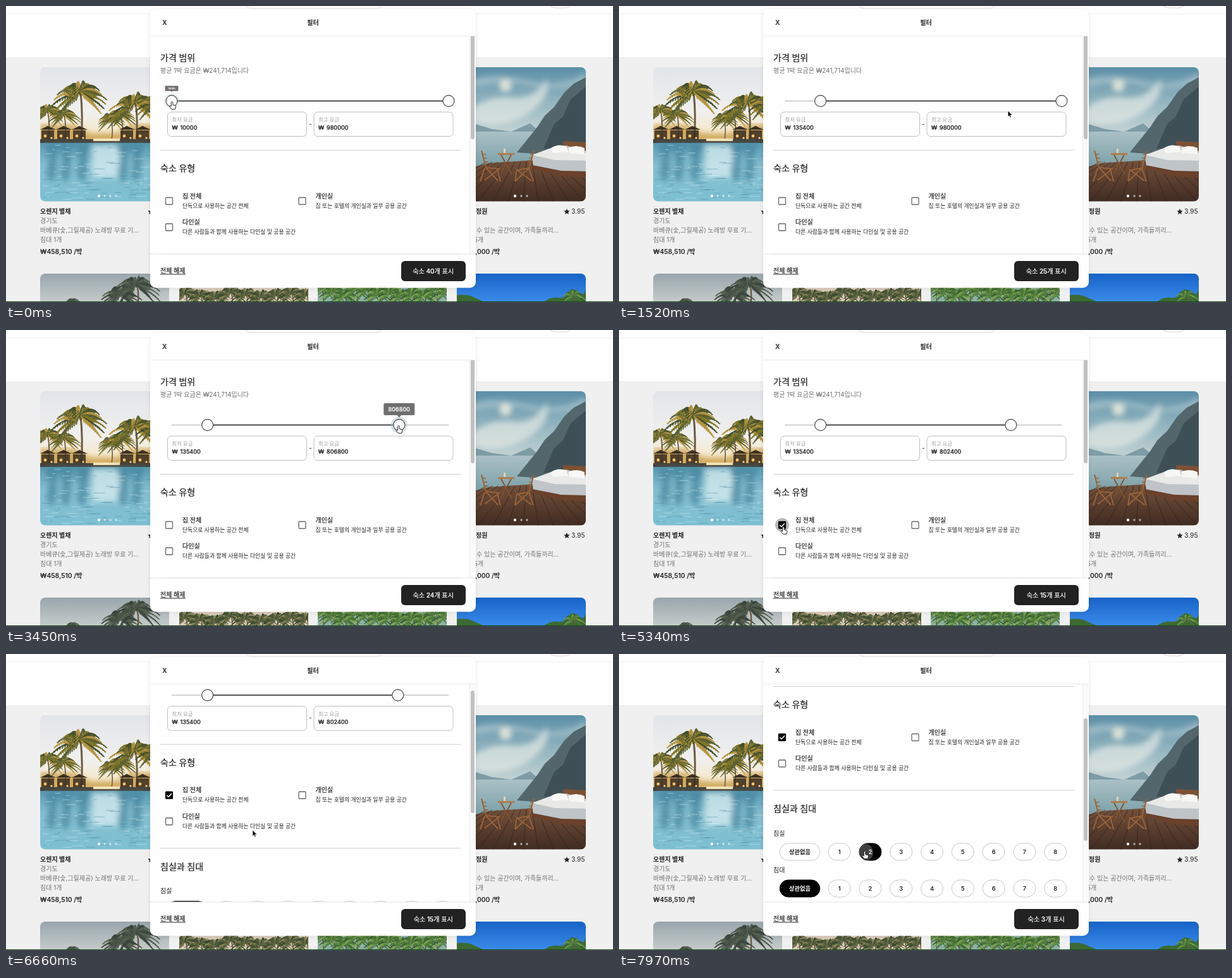
An HTML page for the animation above (8 s loop, 960x469 px).

```html
<!DOCTYPE html>
<html lang="ko">
<head>
<meta charset="utf-8">
<title>필터</title>
<style>
html, body { margin: 0; width: 100%; height: 100%; overflow: hidden; background: #fff; }
svg { display: block; width: 960px; height: 469px; }
text { font-family: Inter, "Noto Sans CJK KR", "Noto Sans CJK JP", "Noto Sans CJK", sans-serif; fill: #222; white-space: pre; }
.mid { text-anchor: middle; }
.grey { fill: #717171; }
.pale { fill: #a0a0a0; }
.semi { font-weight: 500; stroke: #222; stroke-width: .22px; }
.bold { font-weight: 600; }
.white { fill: #fff; stroke: #fff; }
</style>
</head>
<body>
<svg id="stage" viewBox="0 0 960 469"></svg>
<script>
const LOOP = 8000;
const clamp = v => Math.max(0, Math.min(1, v));
const ramp = (t, from, to) => clamp((t - from) / (to - from));

// Linear path through [time, ...values] points.
function along(keys, t) {
  const i = keys.findIndex(k => k[0] > t);
  if (i < 0) return keys[keys.length - 1].slice(1);
  if (i === 0) return keys[0].slice(1);
  const a = keys[i - 1], b = keys[i], p = ramp(t, a[0], b[0]);
  return a.slice(1).map((v, n) => v + (b[n + 1] - v) * p);
}

let seed = 7;
const rand = () => (seed = seed * 16807 % 2147483647) / 2147483647;

// ---- markup helpers; y is the middle of the text line
const text = (x, y, size, str, cls = '', id = '') =>
  `<text x="${x}" y="${y + size * .36}" font-size="${size}" class="${cls}" id="${id}">${str}</text>`;
const rect = (x, y, w, h, fill, more = '') =>
  `<rect x="${x}" y="${y}" width="${w}" height="${h}" fill="${fill}" ${more}/>`;
const path = (d, fill, more = '') => `<path d="${d}" fill="${fill}" ${more}/>`;
const line = (d, color, width = 1) => path(d, 'none', `stroke="${color}" stroke-width="${width}"`);
const dot = (x, y, r, fill, more = '') => `<circle cx="${x}" cy="${y}" r="${r}" fill="${fill}" ${more}/>`;
const grad = (id, ...stops) => `<linearGradient id="${id}" x2="0" y2="1">` +
  stops.map(([o, c]) => `<stop offset="${o}" stop-color="${c}"/>`).join('') + '</linearGradient>';
const clip = (id, x, y, w, h, r = 0) =>
  `<clipPath id="${id}">${rect(x, y, w, h, '#000', `rx="${r}"`)}</clipPath>`;
const soft = (...parts) => `<g filter="url(#soft)">${parts.join('')}</g>`;
const star = (x, y) => {
  let d = '';
  for (let i = 0; i < 10; i++) {
    const a = i * Math.PI / 5, r = i % 2 ? 2.2 : 5;
    d += `${i ? 'L' : 'M'}${x + r * Math.sin(a)} ${y - r * Math.cos(a)}`;
  }
  return path(d + 'Z', '#222');
};

// Arched fronds, each a rib with leaflets hanging on both sides.
function palm(x, y, r, base, colors) {
  let s = line(`M${x} ${y}Q${x + 4} ${(y + base) / 2} ${x + 1} ${base}`, '#6b5a40', r / 14);
  for (let i = 0; i < 16; i++) {
    const a = -Math.PI * (1.2 - i / 15 * 1.4), l = r * (.8 + rand() * .3);
    let d = `M${x} ${y}`, leaves = '';
    for (let k = 1; k <= 10; k++) {
      const p = k / 10, px = x + Math.cos(a) * l * p;
      const py = y + Math.sin(a) * l * p * (1.25 - p * .55) + l * .45 * p * p;
      const len = r * .24 * (1.15 - p);
      d += `L${px} ${py}`;
      leaves += `M${px} ${py}l${Math.cos(a) * len + len * .5} ${len}M${px} ${py}l${Math.cos(a) * len - len * .5} ${len * .8}`;
    }
    s += line(d + leaves, colors[i % colors.length], r / 26);
  }
  return s;
}

function poolPhoto() {
  const leaf = ['#5a6030', '#807528', '#44502c', '#b4933c'];
  let s = rect(54, 97, 204, 120, 'url(#dawn)');
  s += soft(path('M54 216V188h50l30 14h40l25-14h60V216Z', '#c79c45', 'opacity=".8"'));
  s += palm(66, 166, 26, 212, leaf) + palm(92, 172, 24, 212, leaf) + palm(166, 178, 22, 212, leaf) + palm(182, 172, 24, 212, leaf);
  s += palm(118, 136, 42, 213, leaf) + palm(205, 153, 40, 213, leaf) + palm(240, 150, 32, 213, leaf);
  for (let x = 54; x < 250; x += 25) {
    if (x > 122 && x < 165) continue;
    s += path(`M${x} 196l12-6 13 6Z`, '#3d3024') + rect(x + 2, 197, 20, 18, '#3a2e22', 'opacity=".85"');
    s += dot(x + 8, 206, 2.4, '#f7c168') + dot(x + 18, 209, 1.6, '#ffdc92');
  }
  s += rect(54, 211, 204, 6, '#47423a') + rect(138, 210, 42, 4, '#f3e2b4') + rect(54, 217, 204, 93, 'url(#pool)');
  const shade = [70, 92, 118, 182, 204].map(x => path(`M${x - 10} 218q12 18 6 36t8 26q9-16 6-32t8-30Z`, '#3b7d96', 'opacity=".6"'));
  s += soft(rect(136, 220, 44, 52, '#d3eaee', 'opacity=".8"'), ...shade);
  for (let i = 0; i < 110; i++) {
    const y = 220 + rand() * 86, x = 54 + rand() * 174;
    s += rect(x, y, 4 + rand() * 14, 1.3, rand() < .55 ? '#d3edf1' : '#4a8ba4', 'opacity=".4"');
  }
  return s;
}

function lakePhoto() {
  let s = rect(713, 97, 204, 120, 'url(#sky)');
  s += soft(path('M735 165q30-25 65-20t55-30q10 30-30 56t-90 12Z', '#e3e8e4', 'opacity=".7"'),
    path('M735 118q40-14 90 0t92-12v16q-50 14-90 4t-92 4Z', '#c1d3d8', 'opacity=".5"'), dot(790, 126, 10, '#fff8e2', 'opacity=".7"'));
  s += path('M713 200V184l32 4 24 7 30 4 30-13 20 17v20H713Z', '#7e9ca6');
  s += rect(713, 199, 204, 68, 'url(#lake)');
  s += path('M808 232l16-20 16-20 12-18 15-14 16-23 15-14 19-10V240Z', '#52666c');
  s += path('M850 226l17-39 14-12 12-27 24-20V230Z', '#37494e', 'opacity=".75"');
  s += path('M713 262l50-13 60-4 94-9V310H713Z', 'url(#wood)');
  for (let i = 0; i < 14; i++) s += line(`M${760 + i * 9} 247L${650 + i * 24} 310`, '#33221a', .8);
  s += path('M881 214l36 2v27l-36-8Z', '#7d5134');
  s += path('M832 237l28-11 26-5 31 9v37l-39-2-44-8Z', '#bfc4c8');
  s += path('M832 236l30-11 55 8v12l-50-1Z', '#e9e9e7') + path('M862 225q12-8 25-2l2 8-24 2ZM889 225q12-6 26 0v10l-24-2Z', '#f7f7f5');
  s += path('M832 252l46 9 39 1v10l-42-3-43-11Z', '#6a412b');
  s += line('M752 229l7 27 20 2M757 257l-7 21M777 258l5 20M760 257l18 20M781 257l-24 19', '#9a6338', 2);
  s += line('M753 235l6 0M755 241l6 0M757 247l6 0M829 235l5 0M827 241l6 0M826 247l5 0', '#9a6338', 1.5);
  s += line('M835 229l-8 28-20 3M827 257l7 21M808 259l-3 19M809 260l22 17M827 257l-21 20', '#9a6338', 2);
  s += path('M778 233h26v3h-26Z', '#b07b49') + line('M783 236l17 31M799 236l-17 31', '#80522f', 1.8);
  return s + rect(787, 226, 3, 7, '#e0d2b4');
}

function lowerPhotos() {
  const dark = ['#39443c', '#56604f', '#4a5546'], olive = ['#4a5636', '#8a8457', '#36472f'], green = ['#4b7a3c', '#7fa552', '#37602f'];
  let s = `<g clip-path="url(#low0)">${rect(54, 424, 204, 45, 'url(#mist)')}${palm(182, 456, 32, 480, dark)}${palm(207, 441, 34, 475, dark)}${palm(105, 468, 14, 480, dark)}</g>`;
  s += `<g clip-path="url(#low1)">${rect(274, 424, 204, 45, '#d9cbb9')}`;
  for (let x = 284; x < 480; x += 24) s += palm(x, 452 + rand() * 9, 24, 480, olive);
  s += `</g><g clip-path="url(#low2)">${rect(493, 424, 204, 45, '#8fb2a8')}`;
  for (let x = 500; x < 700; x += 18) s += palm(x, 446 + rand() * 12, 24, 480, green);
  s += `</g><g clip-path="url(#low3)">${rect(713, 424, 204, 45, 'url(#blue)')}`;
  s += path('M713 469V458q18-2 30 5l14 6ZM850 469q12-9 24-7t16-8 14-1 13-4V469Z', '#3c6a34');
  s += palm(898, 457, 18, 480, green);
  return s + '</g>';
}

const pager = xs => xs.map((x, i) => dot(x, 301, i ? 1.7 : 2.2, '#fff', `opacity="${i ? .6 : 1}"`)).join('');

const backdrop = () => rect(0, 0, 960, 469, '#fff')
  + rect(0, 12, 960, 1, '#f0f0f0')
  + rect(375, -25, 224, 29, '#fff', 'rx="14" stroke="#e4e4e4"')
  + rect(856, -24, 42, 27, '#fff', 'rx="13" stroke="#d5d5d5"')
  + rect(0, 81, 960, 388, '#f0f0f0')
  + `<g clip-path="url(#shot0)">${poolPhoto()}</g><g clip-path="url(#shot1)">${lakePhoto()}</g>`
  + pager([147, 156, 165, 174]) + pager([805, 815, 824])
  + text(54, 325, 10, '오렌지 별채', 'bold') + star(229, 326)
  + text(54, 340, 10, '경기도', 'grey')
  + text(54, 355, 10, '바베큐(숯,그릴제공) 노래방 무료 기...', 'grey')
  + text(54, 370, 10, '침대 1개', 'grey') + text(54, 389, 10.3, '₩458,510 /박', 'bold')
  + text(743, 325, 10, '정원', 'bold') + star(887, 326) + text(894, 325, 10.3, '3.95')
  + text(744, 355, 10, '수 있는 공간이며, 가족들끼리...', 'grey')
  + text(740, 370, 10, '5개', 'grey') + text(742, 389, 10.3, ',000 /박', 'bold')
  + lowerPhotos();

const field = (x, label, id) => rect(x + .5, 168, 220, 38.5, '#fff', 'rx="6" stroke="#bdbdbd"')
  + text(x + 7.5, 180, 8.3, label, 'pale') + text(x + 7.5, 193, 9.3, '₩', 'semi') + text(x + 20.5, 193, 9, '', 'semi', id);

const option = (x, y, title, note) => rect(x - 5.5, y - 5.5, 11, 11, '#fff', 'rx="1.2" stroke="#666" stroke-width="1.3"')
  + text(x + 21, y - 8, 10, title, 'semi') + text(x + 21, y + 7.5, 8.8, note);

function pills(y, row) {
  let s = '';
  for (let i = 0; i < 9; i++) {
    const x = i ? 348.6 + (i - 1) * 48.8 : 286, w = i ? 35 : 63.5;
    s += rect(x - w / 2, y - 13.5, w, 27, '#fff', `id="pill${row}${i}" rx="13.5" stroke="#c8c8c8"`);
    if (row === 0 && i === 2)
      s += `<g clip-path="url(#pillclip)">${dot(388, y + 1, 0, '#fff', 'id="wave" opacity=".25"')}</g>`;
    s += text(x, y, 9.2, i || '상관없음', 'bold mid', `num${row}${i}`);
  }
  return s;
}

const knob = id => `<g id="${id}">${dot(0, 0, 13, '#a9bfc4', 'opacity="0"')}${dot(0, 0, 9, '#fff', 'stroke="#555" stroke-width="1.3"')}
  <g>${path('M-22.5 -34.5H22.5q2 0 2 2V-17.5q0 2-2 2H3.5L0 -12 -3.5 -15.5H-22.5q-2 0-2-2V-32.5q0-2 2-2Z', '#6f6f6f')}
  ${text(0, -25, 9, '', 'semi mid white')}</g></g>`;

const form = () => text(244, 82, 14, '가격 범위', 'semi')
  + text(244, 102, 10, '평균 1박 요금은 ₩241,714입니다', 'grey')
  + rect(262, 149.7, 438, 1.6, '#c9c9c9') + rect(0, 149.6, 0, 1.8, '#444', 'id="span"')
  + field(255, '최저 요금', 'lowField') + field(486.5, '최고 요금', 'highField') + text(479, 187, 10, '-')
  + rect(244, 228, 475, 1, '#d0d0d0')
  + text(244, 257, 14, '숙소 유형', 'semi')
  + dot(258, 309, 11, '#000', 'id="ripple" opacity="0"')
  + option(258, 309, '집 전체', '단독으로 사용하는 공간 전체')
  + option(468.5, 309, '개인실', '집 또는 호텔의 개인실과 일부 공용 공간')
  + option(258, 350.5, '다인실', '다른 사람들과 함께 사용하는 다인실 및 공용 공간')
  + `<g id="check">${rect(252, 303, 12, 12, '#000', 'rx="1.3"')}${line('M254.3 309l2.6 2.7 5-5.3', '#fff', 1.5)}</g>`
  + rect(244, 392.5, 475, 1, '#d0d0d0')
  + text(244, 422, 14, '침실과 침대', 'semi')
  + text(244, 461, 10, '침실') + pills(490.5, 0)
  + text(244, 519, 10, '침대') + pills(548.5, 1)
  + knob('low') + knob('high');

const dialog = () => rect(228, 5, 515, 441.5, '#fff', 'rx="9" filter="url(#glow)"')
  + `<g clip-path="url(#view)">${rect(733, 47, 9, 347, '#fafafa')}${rect(733, 47, 1, 347, '#ececec')}
     ${rect(735, 17, 6, 194, '#c1c1c1', 'id="bar" rx="3"')}<g id="form">${form()}</g></g>`
  + rect(228, 47, 515, 1, '#ebebeb') + rect(228, 392.5, 515, 1, '#e6e6e6')
  + text(247, 26, 10.5, 'X', 'bold') + text(485.5, 26, 10, '필터', 'bold mid')
  + text(244, 419.5, 10, '전체 해제', 'semi') + rect(244, 424.5, 40, 1, '#222')
  + rect(625, 404, 102, 32, '#222', 'rx="6"') + text(675.7, 420, 10.1, '', 'semi mid white', 'count');

document.getElementById('stage').innerHTML = '<defs>'
  + grad('dawn', [0, '#e2e5ea'], [.6, '#f1f0ee'], [1, '#f8e3b8'])
  + grad('pool', [0, '#5b9ab0'], [.4, '#86c0d1'], [1, '#7dbfd2'])
  + grad('sky', [0, '#5c8fa8'], [.5, '#98b8c2'], [1, '#d3dcda'])
  + grad('lake', [0, '#aac1c6'], [1, '#7298a2'])
  + grad('wood', [0, '#7a563f'], [1, '#402b22'])
  + grad('mist', [0, '#98a6ac'], [1, '#c6cbca'])
  + grad('blue', [0, '#1763c8'], [1, '#3a8bea'])
  + clip('shot0', 54, 97, 204, 212.5, 8) + clip('shot1', 713, 97, 204, 212.5, 8)
  + [54, 274, 493, 713].map((x, i) => clip('low' + i, x, 424, 204, 60, 8)).join('')
  + clip('view', 228, 47.5, 515, 345.5) + clip('pillclip', 379.9, 477, 35, 27, 13.5)
  + `<filter id="soft"><feGaussianBlur stdDeviation="4"/></filter>
     <filter id="glow" x="-10%" y="-10%" width="120%" height="120%"><feDropShadow dx="0" dy="1" stdDeviation="3" flood-opacity=".1"/></filter></defs>`
  + backdrop() + dialog() + rect(0, 468, 960, 1, '#174d1b')
  + `<g id="mouse">${path('M0 0V9.6L2.2 7.6 3.6 10.9 5.2 10.2 3.8 7.1H6.8Z', '#000', 'stroke="#fff" stroke-width=".6"')}
     ${path('M-1.3 .9a1.3 1.3 0 0 1 2.6 0V4.6l3.5.9q1.4.4 1.2 1.8L5 11.4H-.6L-3.8 7.4q-.5-1.4 1-1.4l1.5 1.2Z', '#fff', 'stroke="#111" stroke-width=".9"')}</g>`;

const el = id => document.getElementById(id);
const set = (node, attrs) => { for (const k in attrs) node.setAttribute(k, attrs[k]); };

// ---- motion
const lowKeys = [[0, 10000], [40, 10000], [200, 32000], [450, 82000], [700, 120000], [860, 133000], [950, 135400]];
const highKeys = [[2330, 980000], [2450, 966000], [2800, 900000], [3070, 850000], [3300, 817000], [3450, 806900], [3520, 802400]];
const scrollKeys = [[6000, 0], [6140, 2], [6450, 3], [6550, 38], [6660, 85], [6800, 122], [6970, 153], [7090, 170], [7210, 177]];
const mouseKeys = [[1200, 319, 152], [1240, 340, 152], [1400, 340, 152], [1520, 615, 166], [1800, 660, 162], [2210, 693, 152],
  [2280, 699, 152], [2330, 699, 152], [3520, 619, 152], [3650, 619, 152], [3850, 470, 250], [4170, 315, 348], [4370, 315, 348],
  [4600, 275, 325], [4860, 260, 312], [5600, 260, 312], [5970, 384, 283], [6140, 390, 279], [7310, 390, 279],
  [7430, 407, 302], [7530, 392, 316], [7600, 379, 314], [7660, 388.5, 313]];
const handTimes = [[0, 1410], [2210, 3680], [4780, 5640], [7430, LOOP]];
const priceX = v => 262 + (v - 10000) / 970000 * 438;

function placeKnob(id, value, open) {
  const [halo, , bubble] = el(id).children;
  set(el(id), { transform: `translate(${priceX(value)} 150.5)` });
  set(halo, { opacity: open * .5 });
  set(bubble, { transform: `translate(0 ${-16 * (1 - open)}) scale(${open})` });
  bubble.lastElementChild.textContent = value;
  el(id + 'Field').textContent = value;
}

function paintPill(id, on) {
  const c = Math.round(255 * (1 - on));
  set(el('pill' + id), { fill: `rgb(${c},${c},${c})`, stroke: on > .5 ? '#000' : '#c8c8c8' });
  el('num' + id).style.fill = on > .5 ? '#fff' : '#222';
}

function draw(t) {
  const low = Math.round(along(lowKeys, t)[0] / 100) * 100;
  const high = Math.round(along(highKeys, t)[0] / 100) * 100;
  placeKnob('low', low, Math.min(.42 + t / 140, 1) * (1 - ramp(t, 1410, 1510)));
  placeKnob('high', high, ramp(t, 2280, 2420) * (1 - ramp(t, 3650, 3770)));
  set(el('span'), { x: priceX(low), width: priceX(high) - priceX(low) });

  const checked = t >= 5170, picked = ramp(t, 7830, 7900);
  el('check').style.display = checked ? '' : 'none';
  set(el('ripple'), { r: 5 + 6 * ramp(t, 5170, 5320), opacity: checked ? .28 * (1 - ramp(t, 5480, 5750)) : 0 });
  paintPill('00', 1 - picked);
  paintPill('02', picked);
  paintPill('10', 1);
  set(el('wave'), { r: 14 * ramp(t, 7830, 7970) });

  const free = high < 880000 ? 24 : Math.round(40 - 15 * (low - 10000) / 125400);
  el('count').textContent = `숙소 ${t >= 7860 ? 3 : checked ? 15 : free}개 표시`;

  const [top] = along(scrollKeys, t);
  set(el('form'), { transform: `translate(0 ${-top})` });
  set(el('bar'), { y: 17 + top * .48 });

  let [mx, my] = along(mouseKeys, t);
  if (t < 1200) mx = priceX(low) + .5;
  else if (t > 2330 && t < 3600) mx = priceX(high) - 1;
  const hand = handTimes.some(([a, b]) => t >= a && t < b);
  const [arrowShape, handShape] = el('mouse').children;
  arrowShape.style.display = hand ? 'none' : '';
  handShape.style.display = hand ? '' : 'none';
  set(el('mouse'), { transform: `translate(${mx} ${my})` });
}

const start = performance.now();
function tick() {
  draw((performance.now() - start) % LOOP);
  requestAnimationFrame(tick);
}
tick();
</script>
</body>
</html>
```
